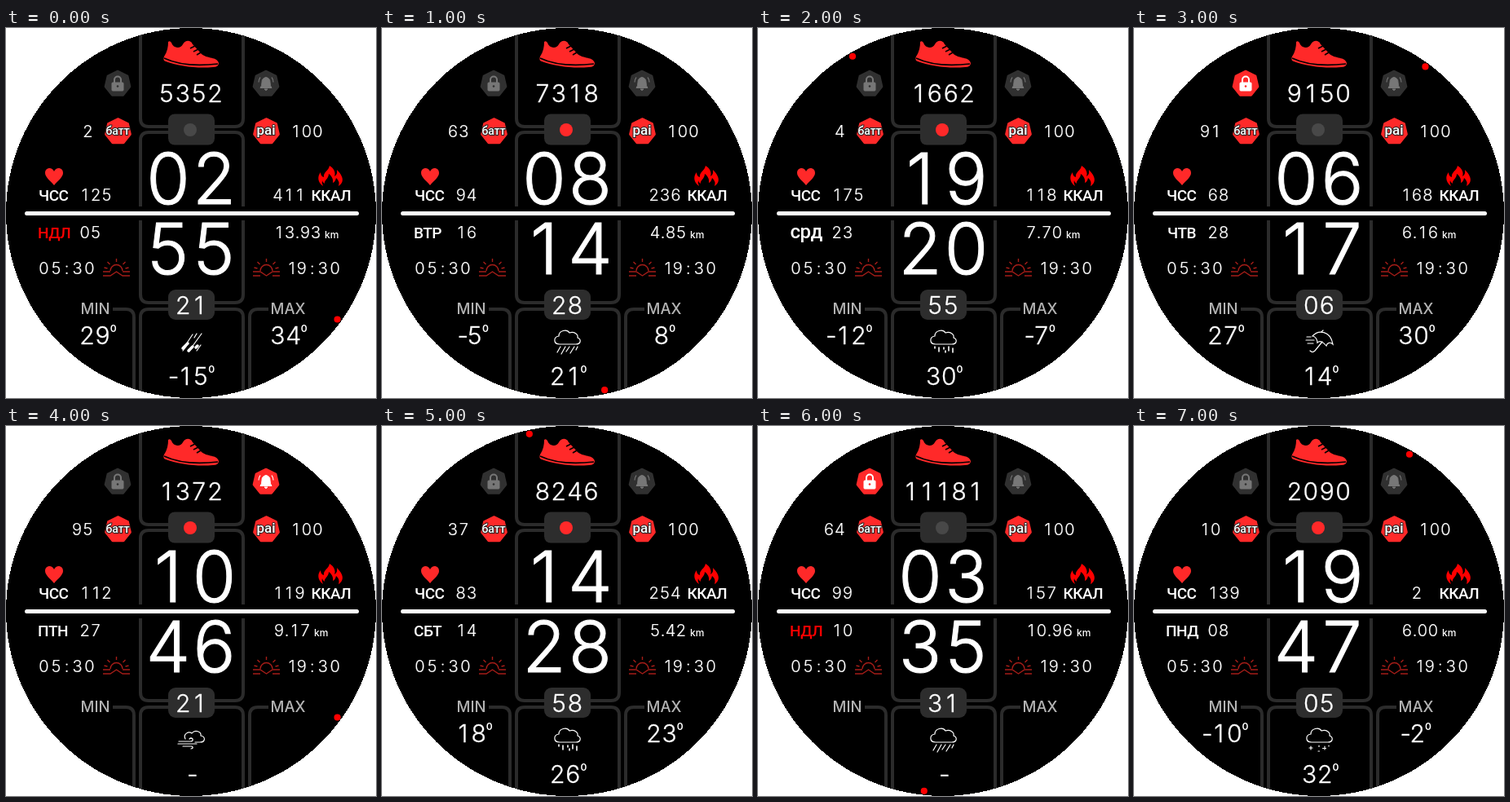
Write an HTML page that moves like this. It is 454 px wide and 454 px high and loops after 8 s.

```html
<!DOCTYPE html>
<html lang="ru">
<head>
<meta charset="utf-8">
<title>Watch face</title>
<style>
  html, body { margin: 0; width: 100%; height: 100%; overflow: hidden; background: #fff; }
  svg { display: block; width: 454px; height: 454px; }
  text { font-family: Inter, "Open Sans", sans-serif; font-weight: 300; fill: #fff; }
  .num { text-anchor: middle; stroke: #fff; stroke-width: .012em; }
  .big { font-size: 86.5px; }
  .mid { font-size: 30px; }
  .small { font-size: 20px; }
  .deg { font-size: 12px; font-weight: 600; text-anchor: middle; }
  .label { font: 500 19px Roboto, sans-serif; letter-spacing: -.5px; }
  .range { font-weight: 500; font-size: 18.5px; fill: #b4b4b4; }
  .unit { font-weight: 500; font-size: 12px; }
  .badge { font: 500 14px Roboto, sans-serif; text-anchor: middle; stroke: #222; stroke-width: 2; paint-order: stroke; }
  .frame { fill: none; stroke: #2b2b2b; stroke-width: 4; }
  .box { fill: #2d2d2d; }
  .red { fill: #ff2929; }
  .hepta { stroke-width: 2.5; stroke-linejoin: round; fill: #ff2929; stroke: #ff2929; }
  .flag .hepta { fill: #303030; stroke: #303030; }
  .flag .sign { fill: #777; stroke: #777; }
  .flag.on .hepta { fill: #ff2929; stroke: #ff2929; }
  .flag.on .sign { fill: #fff; stroke: #fff; }
  .sun { fill: none; stroke: #a51d18; stroke-width: 1.4; }
  .sky { fill: none; stroke: #fff; stroke-width: 1.2; stroke-linecap: round; display: none; }
  .sky.on { display: inline; }
</style>
</head>
<body>
<svg viewBox="0 0 454 454">
  <defs>
    <clipPath id="disc"><circle cx="227" cy="227" r="227"/></clipPath>
    <polygon id="hepta" points="0,-15.5 12.1,-9.7 15.1,3.4 6.7,14 -6.7,14 -15.1,3.4 -12.1,-9.7"/>
    <path id="cloud" d="M218 388C210 388 210 379 217 378C217 371 227 369 230 374C236 372 241 376 240 380C245 382 244 388 238 388Z"/>
    <path id="rays" d="M-7.500 0A7.500 7.500 0 0 1 7.500 0M0 -11V-15M-8 -8L-11 -11M8 -8L11 -11M-11 -3L-15 -4M11 -3L15 -4"/>
  </defs>
  <circle cx="227" cy="227" r="227" shape-rendering="crispEdges"/>
  <g clip-path="url(#disc)">
    <g class="frame">
      <path d="M165 0V111Q165 121 175 121H281Q291 121 291 111V0"/>
      <path d="M165 219V138Q165 128 175 128H281Q291 128 291 138V219"/>
      <path d="M165 236V327Q165 337 175 337H281Q291 337 291 327V236"/>
      <path d="M165 454V355Q165 345 175 345H281Q291 345 291 355V454"/>
      <path d="M131 345H147Q157 345 157 355V454"/>
      <path d="M322 345H309Q299 345 299 355V454"/>
    </g>
    <rect class="box" x="199" y="105.500" width="57" height="38" rx="8"/>
    <rect class="box" x="199" y="321" width="57" height="37" rx="9"/>
    <circle id="link" cx="226" cy="125" r="8"/>

    <!-- shoe -->
    <path class="red" d="M199 17Q201 15 203 18C205 25 214 26 217 20Q220 15 225 16Q228 17 229 20L240 32C247 38 259 35 261 43Q261 48 254 48C235 50 213 47 196 41Q192 40 194 35C198 29 199 23 199 17Z"/>
    <path d="M194 37C211 45 235 47 260 44M226 25L232 22M230 29L236 26M234 33L239 30" fill="none" stroke="#000" stroke-width="1.600"/>

    <!-- status badges -->
    <g id="lock" class="flag" transform="translate(137 68.500)">
      <use href="#hepta" class="hepta"/>
      <rect class="sign" x="-7" y="-1.500" width="14" height="10" rx="1" stroke="none"/>
      <path class="sign" d="M-4 -1V-5A4 4 0 0 1 4 -5V-1" style="fill:none" stroke-width="2"/>
      <circle class="hepta" cy="3" r="1.300" style="stroke:none"/>
    </g>
    <g id="bell" class="flag" transform="translate(319 68.500)">
      <use href="#hepta" class="hepta"/>
      <path class="sign" d="M-7 5Q-5 3 -5 -2Q-5 -7 0 -8Q5 -7 5 -2Q5 3 7 5ZM-2 6.500H2Q0 9.500 -2 6.500Z" stroke="none"/>
      <path class="sign" d="M-7 -8Q-9 -5 -9 -2M7 -8Q9 -5 9 -2" style="fill:none" stroke-width="1.200"/>
    </g>
    <use href="#hepta" class="hepta" x="137.500" y="127"/>
    <text class="badge" x="137" y="131">батт</text>
    <use href="#hepta" class="hepta" x="319.500" y="127"/>
    <text class="badge" x="319" y="131" style="font-size:17px">pai</text>

    <!-- heart and flame -->
    <path class="red" d="M59 193C54 187 48 183 48 178C48 171 56.500 170 59 176C61.500 170 70 171 70 178C70 183 64 187 59 193Z"/>
    <path fill="#f00" d="M389 194C382 189 382 182 386 177Q386 182 390 183C389 177 396 175 397 169C402 172 405 177 403 182Q407 180 406 174C412 180 417 188 408 194Q410 188 405 184Q404 189 401 190C402 185 399 181 396 179C396 185 390 187 391 191Q388 189 388 187Q387 190 389 194Z"/>

    <!-- sunrise and sunset -->
    <g class="sun">
      <use href="#rays" x="135.500" y="298"/>
      <path d="M119 304H128L135.500 299L143 304H152M119 299H128M143 299H152"/>
      <use href="#rays" x="319.500" y="298"/>
      <path d="M303 299H312L319.500 304L327 299H336M303 304H312M327 304H336"/>
    </g>

    <text class="label" x="40" y="212">ЧСС</text>
    <text class="label" x="374.500" y="212">ККАЛ</text>
    <text class="label" id="day" y="257.500"></text>
    <text class="range" x="91.500" y="351">MIN</text>
    <text class="range" x="324.500" y="351">MAX</text>
    <text class="unit" id="unit" y="258">km</text>

    <!-- weather -->
    <g id="skies">
      <g class="sky"><path d="M221 388L229 376M217 396L221 391M227 393L240 375M225 397L229 391M234 396L239 389M231 380L234 375"/><path d="M217 393L223 387M224 396L229 391M233 392L235 390" stroke-width="3.500"/></g>
      <g class="sky"><use href="#cloud"/><path d="M217 391V393M222 392V397M228 392V394M230 396V398M234 391V396M239 393V398" stroke-width="1.600"/></g>
      <g class="sky"><path d="M219 378C226 370 241 371 244 388C241 385 237 386 236 390C232 385 228 383 225 386C225 382 222 378 219 378ZM231 385L222 396Q219 399 216 396M230 373L232 371M212 379H217M211 383H221M213 387H220"/></g>
      <g class="sky"><path d="M220 384C217 378 224 374 228 377C232 372 240 375 239 380C245 381 245 388 238 388H232M212 387H226Q230 387 229 384Q227 382 225 384M211 390H234M217 393H228Q231 395 227 396"/></g>
      <g class="sky"><use href="#cloud"/><path d="M219 391L215 398M225 391L220 400M230 391L226 397M236 391L231 399M240 391L238 395"/></g>
      <g class="sky"><use href="#cloud"/><path d="M217 393V397M215 395H219M227 392V394M234 393V398M231.500 395.500H236.500M226 399H228M239 392V393" stroke-dasharray="1.500 1"/></g>
    </g>

    <g id="digits"></g>
    <rect x="23" y="225" width="410" height="5" rx="2.500" fill="#fff"/>
    <circle id="second" r="4.100" fill="#f00"/>
  </g>
</svg>
<script>
const $ = id => document.getElementById(id);
const keys = 'steps hour min sec batt pulse kcal day date km low high temp sky lock bell link'.split(' ');
const states = [
  '5352 02 55 21 2 125 411 НДЛ 05 13.93 29 34 -15 0 0 0 0',
  '7318 08 14 28 63 94 236 ВТР 16 4.85 -5 8 21 4 0 0 1',
  '1662 19 20 55 4 175 118 срд 23 7.70 -12 -7 30 1 0 0 1',
  '9150 06 17 06 91 68 168 ЧТВ 28 6.16 27 30 14 2 1 0 0',
  '1372 10 46 21 95 112 119 ПТН 27 9.17 . . - 3 0 1 1',
  '8246 14 28 58 37 83 254 СБТ 14 5.42 18 23 26 1 0 0 1',
  '11181 03 35 31 64 99 157 НДЛ 10 10.96 . . - 4 1 0 0',
  '2090 19 47 05 10 139 2 ПНД 08 6.00 -10 -2 32 5 0 0 1'
].map(row => Object.fromEntries(row.split(' ').map((v, i) => [keys[i], v])));

function addText(cls, y) {
  const el = document.createElementNS('http://www.w3.org/2000/svg', 'text');
  el.setAttribute('class', cls);
  el.setAttribute('y', y);
  $('digits').append(el);
  return el;
}

// Monospaced figures; align 0 = left, .5 = centre, 1 = right.
function figure(cls, x, y, pitch, align = .5, narrow = { '.': 6, '-': 9.5 }) {
  const el = addText('num ' + cls, y);
  return (str, extra = 0) => {
    const widths = [...str].map(c => narrow[c] || pitch);
    const total = widths.reduce((a, b) => a + b, extra);
    let pos = x - total * align;
    const xs = widths.map(w => (pos += w) - w / 2);
    el.setAttribute('x', xs.join(' '));
    el.textContent = str;
    return pos;
  };
}

function degrees(x, y) {
  const num = figure('mid', x, y, 19.2), mark = addText('deg', y - 15);
  return str => {
    const bare = str === '-' || str === '.';
    const end = num(str === '.' ? '' : str, bare ? 0 : 8);
    mark.setAttribute('x', end + 3.6);
    mark.textContent = bare ? '' : '0';
  };
}

const show = {
  steps: figure('mid', 226.7, 91, 19.9),
  hour: figure('big', 227.3, 216, 56.5),
  min: figure('big', 227.3, 302, 56.5),
  sec: figure('mid', 227, 351, 19.6),
  batt: figure('small', 107, 134, 13.4, 1),
  pulse: figure('small', 90, 212, 13.4, 0),
  kcal: figure('small', 347, 212, 13.4),
  date: figure('small', 90, 258, 13.4, 0),
  low: degrees(113, 388),
  high: degrees(347, 388),
  temp: degrees(228.7, 438)
};
const km = figure('small', 328.5, 258, 13, 0);
const clock = { ':': 11, '1': 9 };
figure('small', 369, 134, 13.5)('100');
figure('small', 74.5, 302, 15, .5, clock)('05:30');
figure('small', 378.8, 302, 15, .5, clock)('19:30');

function render(s) {
  for (const key in show) show[key](s[key]);
  $('unit').setAttribute('x', km(s.km) + 4.5);

  const day = $('day'), lower = s.day === 'срд';
  day.textContent = s.day;
  day.setAttribute('x', lower ? 39.5 : s.day === 'ЧТВ' ? 41 : 39);
  day.style.fontSize = lower ? '24px' : '';
  day.style.fill = s.day === 'НДЛ' ? '#f00' : '#fff';

  [...$('skies').children].forEach((g, i) => g.classList.toggle('on', i === +s.sky));
  for (const id of ['lock', 'bell']) $(id).classList.toggle('on', s[id] === '1');
  $('link').setAttribute('fill', s.link === '1' ? '#ff2929' : '#484848');

  const a = s.sec * Math.PI / 30;
  $('second').setAttribute('cx', 227 + 222 * Math.sin(a));
  $('second').setAttribute('cy', 227 - 222 * Math.cos(a));
}

let shown = -1;
function tick() {
  const i = Math.floor(performance.now() / 1000) % states.length;
  if (i !== shown) render(states[shown = i]);
  requestAnimationFrame(tick);
}
tick();
</script>
</body>
</html>
```
